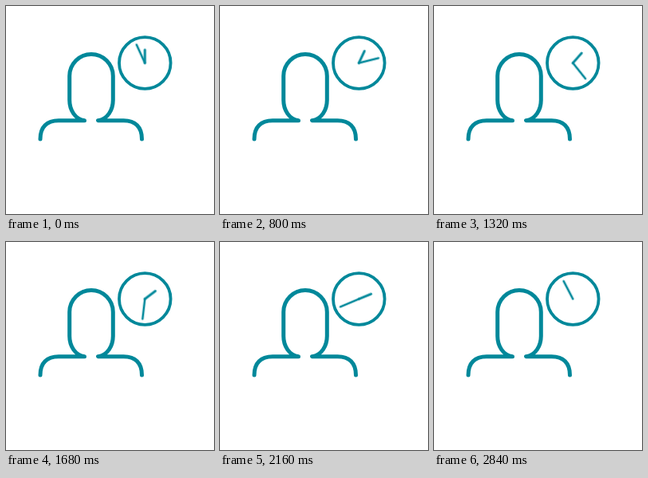
An HTML page without scripts for the animation above (2880 ms loop, 261 px wide and 261 px high).

```html
<!DOCTYPE html>
<html lang="en">
<head>
<meta charset="utf-8">
<title>Person and clock</title>
<style>
  html, body {
    margin: 0;
    width: 100%;
    height: 100%;
    overflow: hidden;
    background: #fff;
  }
  svg {
    display: block;
    width: 100%;
    height: 100%;
    fill: none;
    stroke: #00889a;
    stroke-linecap: round;
    stroke-linejoin: round;
  }
  .person { stroke-width: 5; }
  .face { stroke-width: 3.8; }

  /* Hands advance once every 40 ms */
  .hand { animation: turn 2880ms steps(72) infinite; }
  .minute { --from: -24.6deg; --to: 337.6deg; stroke-width: 2.6; }
  .hour { --from: 0deg; --to: 90.5deg; stroke-width: 3; }
  .blink { animation: blink 2880ms step-end infinite; }

  @keyframes turn {
    from { transform: rotate(var(--from)); }
    to { transform: rotate(var(--to)); }
  }
  /* The hour hand drops out for the last tick */
  @keyframes blink {
    0% { visibility: visible; }
    98.611%, 100% { visibility: hidden; }
  }
</style>
</head>
<body>
<svg viewBox="0 0 261 261">
  <g class="person">
    <path d="M43 167C43 152 51 143.7 66 143.7H98.5C87 142 79.7 131 79.7 118V87.8a27.3 27.3 0 0 1 54.6 0V118C134.3 131 127 142 115.5 143.7H147.5C162.500 143.700 170.500 152 170.500 167"/>
  </g>
  <g transform="translate(174.300 71.500)">
    <circle class="face" r="32.300"/>
    <g class="blink"><path class="hand hour" d="M0 0V-16.500"/></g>
    <path class="hand minute" d="M0 0V-25.200"/>
  </g>
</svg>
</body>
</html>
```
